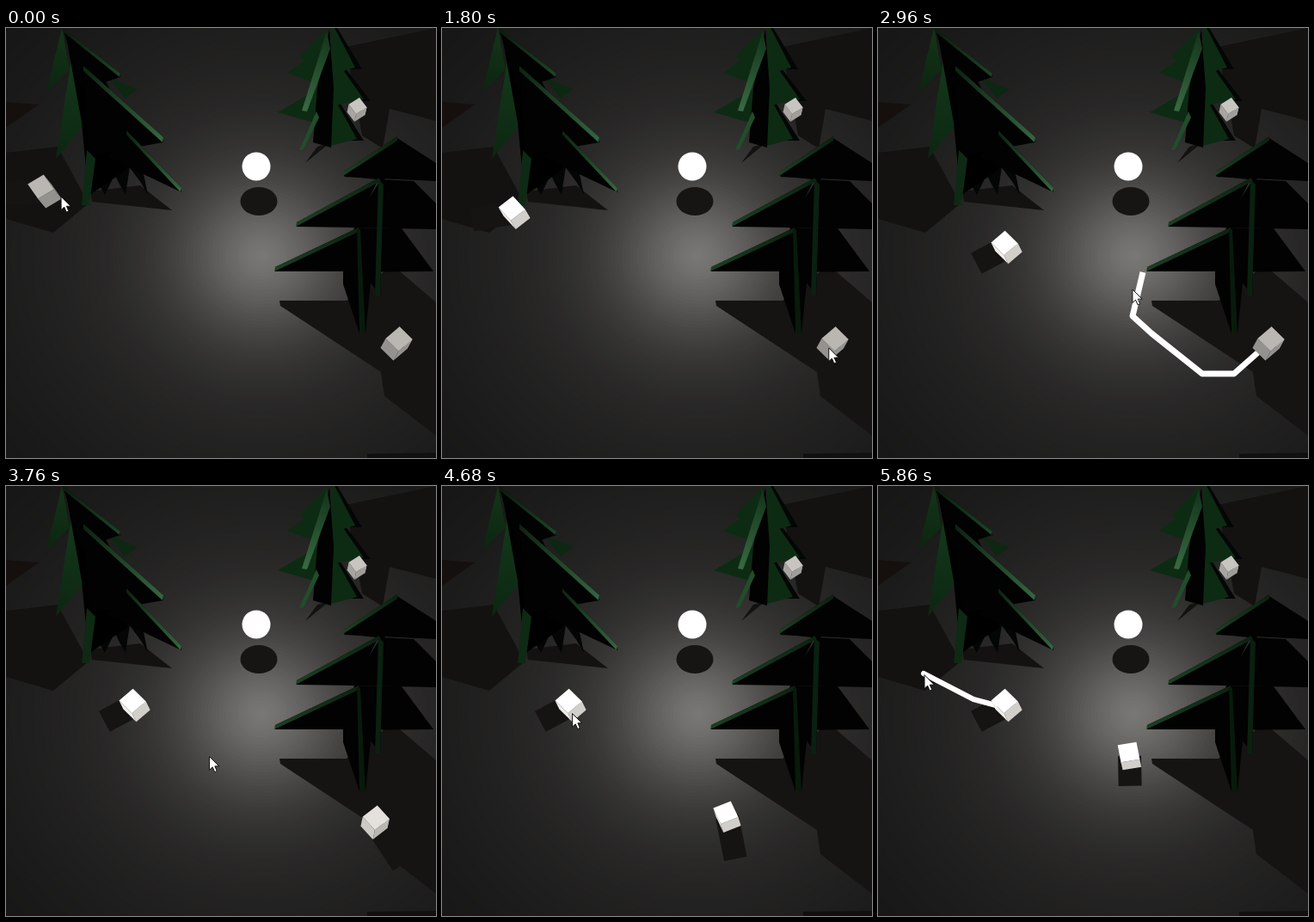
Write an HTML page with a canvas that moves like this. It is 500 by 500 pixels and loops after 5.88 s.

```html
<!DOCTYPE html>
<html lang="en">
<head>
<meta charset="utf-8">
<title>Night forest</title>
<style>
html, body { margin: 0; width: 100%; height: 100%; overflow: hidden; background: #141312; }
canvas { display: block; width: 100vw; height: 100vh; }
</style>
</head>
<body>
<canvas id="stage" width="500" height="500"></canvas>
<script>
const LOOP = 5880;
const LAMP = [290, 180];
const ctx = document.getElementById('stage').getContext('2d');
const scene = document.createElement('canvas');
scene.width = scene.height = 500;
const sc = scene.getContext('2d');

const mix = (a, b, k) => a + (b - a) * k;
const add = (p, q) => [p[0] + q[0], p[1] + q[1]];
const gray = v => `rgb(${Math.round(v)},${Math.round(v * 0.985)},${Math.round(v * 0.965)})`;

function poly(c, color, ...pts) {
  c.fillStyle = color;
  c.beginPath();
  pts.forEach(p => c.lineTo(...p));
  c.fill();
}
function disc(c, color, x, y, rx, ry) {
  c.fillStyle = color;
  c.beginPath();
  c.ellipse(x, y, rx, ry, 0, 0, 7);
  c.fill();
}
function ramp(from, to, c0, c1) {
  const g = sc.createLinearGradient(...from, ...to);
  g.addColorStop(0, c0);
  g.addColorStop(1, c1);
  return g;
}

// Pool of light: a narrow glow on a wide falloff
function ground() {
  for (let r = 560; r > 0; r -= 4) {
    const v = 11 + 48 * Math.exp(-((r / 90) ** 2)) + 63 * Math.exp(-r / 230);
    disc(sc, gray(v), 298, 265, r * 1.06, r);
  }
  poly(sc, '#111010', [420, 495], [500, 494], [500, 500], [420, 500]);
}

function shadows() {
  const dark = '#131211';
  poly(sc, '#150f0e', [0, 86], [38, 89], [0, 116]);
  poly(sc, dark, [0, 145], [60, 138], [96, 204], [55, 238], [0, 222]);
  poly(sc, dark, [98, 190], [156, 183], [193, 212], [100, 202]);
  poly(sc, dark, [395, 22], [500, 0], [500, 108], [446, 94], [438, 140], [414, 125]);
  poly(sc, dark, [348, 157], [362, 138], [376, 134]);
  poly(sc, '#161313', [318, 317], [396, 317], [440, 283], [458, 283], [500, 319], [500, 474], [440, 428], [436, 400], [319, 323]);
  disc(sc, '#161514', 294, 201.5, 21.5, 16.5);
}

// A black branch with a lit edge running from root to tip
function branch(root, tip, base, thick, c0, c1) {
  poly(sc, '#010201', root, tip, add(tip, [0, thick]), base);
  poly(sc, ramp(root, tip, c0, c1), root, tip, add(tip, [-1, thick]), add(root, [0, thick]));
}

function leftTree() {
  const lit = ['#0c2211', '#356440'];
  poly(sc, '#0d2712', [120, 58], [153, 71], [138, 82]);
  poly(sc, ramp([66, 0], [50, 74], '#143519', '#0c2510'), [65, 0], [74, 48], [47, 75]);
  poly(sc, ramp([80, 40], [60, 152], '#14381b', '#0c2611'), [76, 36], [94, 108], [58, 152]);
  for (const x of [115, 139, 165]) poly(sc, '#030604', [90, 90], [x - 8, 180], [x, 194], [150, 122]);
  poly(sc, '#000', [70, 10], [110, 50], [150, 130], [140, 165], [96, 195], [88, 110]);
  branch([66, 0], [133, 53], [88, 72], 4, '#0a1c0e', '#1d4427');
  branch([90, 44], [183, 127], [96, 148], 6, ...lit);
  branch([140, 119], [204, 186], [118, 150], 5, ...lit);
  poly(sc, '#0e2a14', [94, 142], [104, 152], [97, 206], [88, 206]);
}

function topTree() {
  for (const [x, y] of [[341, 34], [327, 52], [316, 98]])
    poly(sc, '#0d2b13', [374, y - 34], [x, y], [364, y + 14]);
  for (const [x, y] of [[416, 131], [424, 85], [414, 48]]) {
    poly(sc, '#030604', [378, y - 60], [x, y], [378, y]);
    poly(sc, '#0d2b13', [378, y - 56], [x - 8, y - 2], [378, y + 6]);
  }
  poly(sc, '#010201', [376, 2], [381, 70], [378, 139], [357, 133], [362, 70]);
  poly(sc, ramp([376, 4], [346, 97], '#12331a', '#396a42'), [373, 4], [377, 24], [350, 97], [344, 96]);
  poly(sc, '#214d2b', [361, 97], [364, 104], [346, 141], [341, 142]);
}

function rightTree() {
  const lit = ['#0c2111', '#1b3f24'];
  poly(sc, '#010201', [455, 128], [500, 157], [500, 178], [393, 173]);
  poly(sc, '#010201', [436, 176], [474, 178], [500, 204], [500, 234], [400, 232]);
  poly(sc, '#010201', [405, 232], [460, 233], [497, 283], [392, 284]);
  poly(sc, '#010201', [392, 280], [436, 280], [435, 311], [424, 296], [418, 355], [411, 355], [392, 298]);
  branch([455, 126], [393, 167], [440, 177], 5, ...lit);
  branch([434, 174], [338, 226], [405, 232], 5, ...lit);
  branch([410, 232], [313, 278], [410, 283], 5, ...lit);
  poly(sc, '#0a2010', [433, 176], [439, 182], [435, 311], [429, 311]);
  poly(sc, '#081a0c', [408, 234], [412, 234], [418, 355], [411, 355]);
}

// Linear travel through [time, values] keys
function at(keys, t) {
  const i = keys.findIndex(k => k[0] > t);
  if (i < 0) return keys[keys.length - 1][1];
  if (i === 0) return keys[0][1];
  const [t0, a] = keys[i - 1], [t1, b] = keys[i];
  return a.map((v, j) => mix(v, b[j], (t - t0) / (t1 - t0)));
}

// Values: centre x, y, turn in degrees, lean x, y of the upright edges, light
const cubeA = [[1450, [45, 190, -33, 9, 11, 0]], [1750, [78, 211, -40, 6, 10, 1]],
  [2300, [143.5, 251, -43, 5, 10, 1]], [2370, [149.5, 255, -43, 5, 10, 1]]];
const cubeB = [[3500, [454, 367, -43, -6, 11, 0]], [3930, [413, 407, -38, 0, 11, 1]],
  [4240, [374, 417, -35, 4, 10, 1]], [4800, [320, 376, -20, 3, 10, 1]],
  [5120, [291, 324, -13, 3, 9, 1]], [5220, [292.5, 314, -10, 2, 9, 1]]];

function shadow([x, y]) {
  const dx = x - LAMP[0], dy = y - LAMP[1], d = Math.hypot(dx, dy), len = 8 + 0.2 * d;
  ctx.strokeStyle = '#151413';
  ctx.lineWidth = 27;
  ctx.lineCap = 'butt';
  ctx.beginPath();
  ctx.moveTo(x, y);
  ctx.lineTo(x + dx / d * len, y + dy / d * len);
  ctx.stroke();
}

function cube([x, y, turn, wx, wy, light], size = 22) {
  const a = turn * Math.PI / 180, w = [wx, wy];
  const u = [Math.cos(a) * size, Math.sin(a) * size * 0.92];
  const v = [-Math.sin(a) * size, Math.cos(a) * size * 0.92];
  const p = [x - (u[0] + v[0] + wx) / 2, y - (u[1] + v[1] + wy) / 2];
  const q = add(p, u), r = add(q, v), s = add(p, v);
  const side = (m, n, dim, lit) => poly(ctx, gray(mix(dim, lit, light)), m, n, add(n, w), add(m, w));
  side(q, r, 148, 205);
  side(p, s, 148, 242);
  side(s, r, 148, 210);
  poly(ctx, light === 1 ? '#fff' : gray(mix(186, 255, light)), p, q, r, s);
}

const mouse = [[0, [64, 196]], [1200, [154, 262]], [1800, [450, 372]], [1960, [414, 386]],
  [2120, [377, 384]], [2300, [342, 345]], [2640, [295, 325]], [2800, [303, 284]], [2960, [296, 304]],
  [4240, [201, 321]], [4740, [145, 257]], [5120, [55, 236]], [5860, [54, 220]]];

// Dragged lines: every passed key stays as a corner, the end follows the track
const lines = [
  { end: 1240, width: 6.5, track: [[100, [50, 196]], [1200, [156, 262]]] },
  { end: 3040, width: 7, track: [[1850, [450, 370]], [2000, [414, 402]], [2150, [377, 402]],
    [2450, [318, 355]], [2640, [296, 335]], [2840, [308, 284]]] },
  { end: LOOP, width: 6, track: [[4980, [137, 255]], [5120, [111, 248]], [5500, [53, 218]]] }
];

function drawLine({ end, width, track }, t) {
  if (t < track[0][0] || t >= end) return;
  ctx.strokeStyle = '#fff';
  ctx.lineWidth = width;
  ctx.lineJoin = 'round';
  ctx.lineCap = width === 6 ? 'round' : 'butt';
  ctx.beginPath();
  track.filter(k => k[0] <= t).forEach(k => ctx.lineTo(...k[1]));
  ctx.lineTo(...at(track, t));
  ctx.stroke();
}

const arrow = new Path2D('M0 0V15.5L3.6 12.2L6.2 18L8.8 16.8L6.3 11.2H11.2Z');
function cursor([x, y]) {
  ctx.save();
  ctx.translate(x, y);
  ctx.fillStyle = '#fff';
  ctx.fill(arrow);
  ctx.strokeStyle = '#111';
  ctx.lineWidth = 1;
  ctx.stroke(arrow);
  ctx.restore();
}

[ground, shadows, leftTree, topTree, rightTree].forEach(draw => draw());
disc(sc, '#fff', 291, 161, 16.5, 16.5);

function frame(t) {
  const cubes = [at(cubeA, t), at(cubeB, t)];
  ctx.drawImage(scene, 0, 0);
  cubes.forEach(shadow);
  lines.forEach(l => drawLine(l, t));
  cubes.forEach(c => cube(c));
  cube([408, 95, -35, -2, 9, 0.2], 15);
  cursor(at(mouse, t));
}

const start = performance.now();
function tick() {
  frame((performance.now() - start) % LOOP);
  requestAnimationFrame(tick);
}
tick();
</script>
</body>
</html>
```
